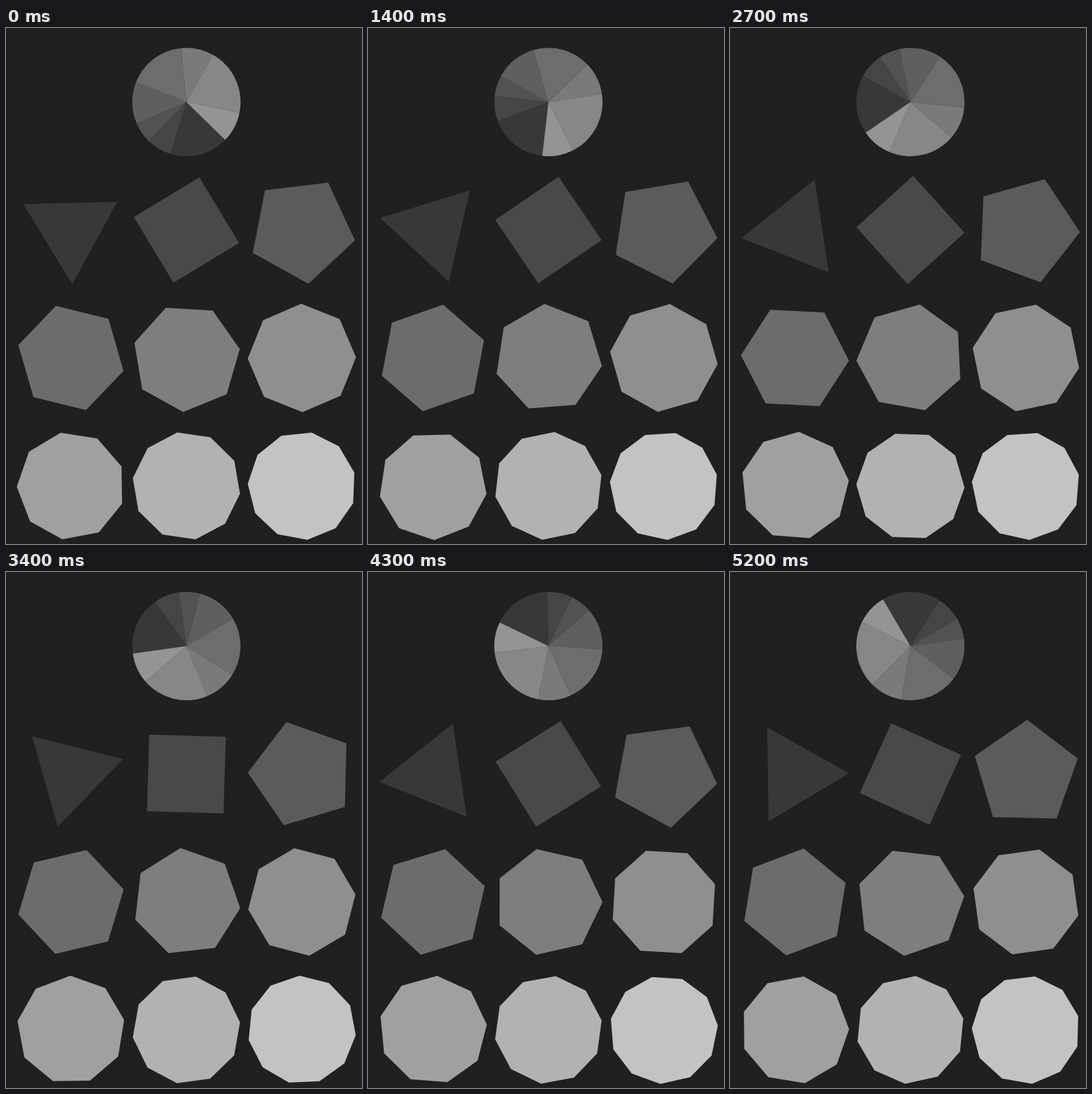
Recreate the animation shown at these times as an HTML page with a canvas. Size 592 by 857 pixels, loop 5.3 s.

```html
<!DOCTYPE html>
<html lang="en">
<head>
<meta charset="utf-8">
<title>Spinning polygons</title>
<style>
  html, body { margin: 0; width: 100%; height: 100%; overflow: hidden; background: #202020; }
  canvas { display: block; }
</style>
</head>
<body>
<canvas id="stage" width="592" height="857"></canvas>
<script>
const ctx = document.getElementById('stage').getContext('2d');
const TAU = Math.PI * 2;
const RADIUS = 90;
const STEP_MS = 100;
const STEPS = 53;
const COLUMNS = [108, 300, 492];
const TOP = 123;
const ROW_GAP = 212.5;
const SLICES = [63, 27, 22.5, 45, 62.5, 35, 72, 33];

// Base angle in degrees at given steps; nearly constant speed with a slight drift.
const START_ANGLE = 254.77;
const TURN = [[0, 0], [6, 7.44], [14, 17.39], [27, 33.8], [34, 42.58], [43, 53.85], [52, 65.09]];

const rad = degrees => degrees * Math.PI / 180;
const gray = value => `rgb(${value}, ${value}, ${value})`;
const ramp = (i, last, from, to) => gray(Math.round(from + (to - from) * i / last));

function baseAngle(step) {
  const i = TURN.findIndex(([s]) => s >= step);
  if (i < 1) return START_ANGLE;
  const [s0, a0] = TURN[i - 1];
  const [s1, a1] = TURN[i];
  return START_ANGLE + a0 + (a1 - a0) * (step - s0) / (s1 - s0);
}

function drawPie(x, y, degrees) {
  let start = rad(degrees);
  SLICES.forEach((size, i) => {
    const end = start + rad(size);
    ctx.fillStyle = ramp(i, SLICES.length - 1, 56, 148);
    ctx.beginPath();
    ctx.moveTo(x, y);
    ctx.arc(x, y, RADIUS, start, end);
    ctx.fill();
    start = end;
  });
}

function drawPolygon(x, y, sides, degrees) {
  ctx.beginPath();
  for (let i = 0; i < sides; i++) {
    const a = rad(degrees) + TAU * i / sides;
    ctx.lineTo(x + RADIUS * Math.cos(a), y + RADIUS * Math.sin(a));
  }
  ctx.fill();
}

function draw(step) {
  const angle = baseAngle(step);
  ctx.fillStyle = gray(32);
  ctx.fillRect(0, 0, 592, 857);
  drawPie(COLUMNS[1], TOP, angle * 3);
  for (let i = 0; i < 9; i++) {
    const row = Math.floor(i / 3);
    const col = i % 3;
    ctx.fillStyle = ramp(i, 8, 56, 195);
    // Speed drops with each row and column.
    drawPolygon(COLUMNS[col], TOP + ROW_GAP * (row + 1), i + 3, angle * (6 - row - col));
  }
}

let origin;
function tick(now) {
  origin ??= now;
  draw(Math.floor((now - origin) / STEP_MS) % STEPS);
  requestAnimationFrame(tick);
}
draw(0);
requestAnimationFrame(tick);
</script>
</body>
</html>
```
